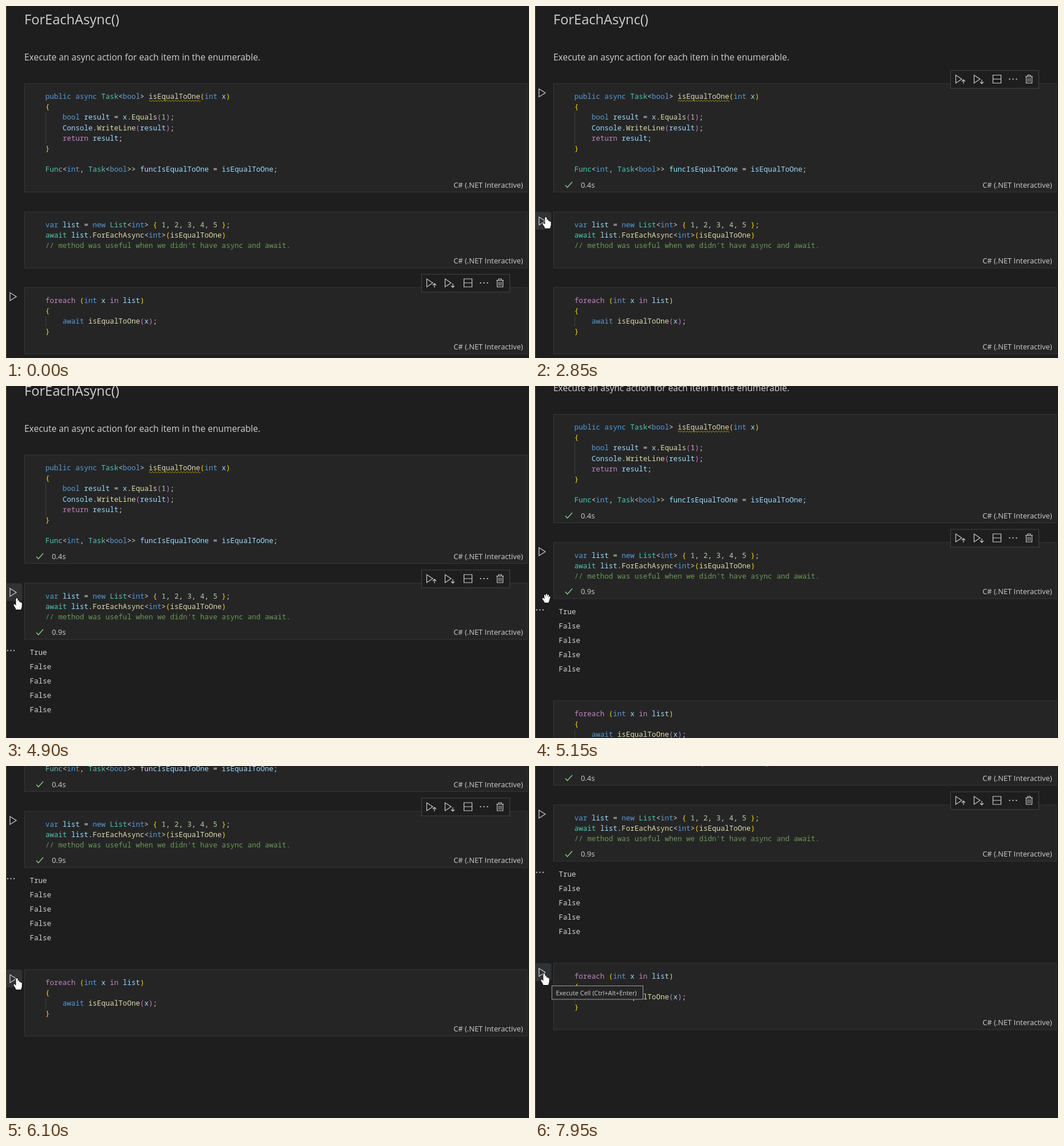
An HTML page with a canvas that plays this animation: 913x614 px, repeating every 8 s.

```html
<!DOCTYPE html>
<html lang="en">
<head>
<meta charset="utf-8">
<title>ForEachAsync notebook</title>
<style>
html, body { margin: 0; height: 100%; overflow: hidden; background: #1e1e1e; }
canvas { display: block; }
</style>
</head>
<body>
<canvas id="stage" width="913" height="614"></canvas>
<script>
const ctx = document.getElementById('stage').getContext('2d');
const LOOP = 8000;
const UI = '"Open Sans", "Noto Sans", sans-serif';
const MONO = '12.52px "Noto Sans Mono", monospace';
const LINE = 18.2;
const BUTTON = 31;

const COLORS = {
  k: '#569cd6', t: '#4ec9b0', v: '#9cdcfe', f: '#dcdcaa', c: '#c586c0',
  g: '#ffd700', m: '#da70d6', n: '#b5cea8', p: '#d4d4d4', r: '#6a9955'
};

// Tokens are split by "~"; the first letter of each picks its colour.
const CELLS = [
  { top: 135.5, height: 189, guide: [49, 105], code: [
    'kpublic async ~tTask~p<~kbool~p> ~fisEqualToOne~g(~kint ~vx~g)',
    'g{',
    'k    bool ~vresult ~p= ~vx~p.~fEquals~m(~n1~m)~p;',
    'v    Console~p.~fWriteLine~m(~vresult~m)~p;',
    'c    return ~vresult~p;',
    'g}',
    'p',
    'tFunc~p<~kint~p, ~tTask~p<~kbool~p>> ~vfuncIsEqualToOne ~p= ~visEqualToOne~p;'
  ] },
  { top: 359, height: 98, code: [
    'kvar ~vlist ~p= ~knew ~tList~p<~kint~p> ~g{ ~n1~p, ~n2~p, ~n3~p, ~n4~p, ~n5 ~g}~p;',
    'tawait ~vlist~p.~fForEachAsync~p<~kint~p>~g(~fisEqualToOne~g)',
    "r// method was useful when we didn't have async and await."
  ] },
  { top: 491, height: 116, guide: [50, 69], code: [
    'cforeach ~g(~kint ~vx ~cin ~vlist~g)',
    'g{',
    'k    await ~fisEqualToOne~m(~vx~m)~p;',
    'g}'
  ] }
];

// When each cell is clicked, starts counting and finishes.
const RUNS = [
  { click: 1150, start: 1370, end: 1830 },
  { click: 3350, start: 3460, end: 4440 }
];
const OUTPUT_AT = 4400;
const OUTPUT_HEIGHT = 144;
const TOOLTIPS = [
  { from: 3850, to: 4480, y: 383.5, width: 112, text: 'Stop Cell Execution' },
  { from: 7150, to: LOOP, y: 383.5, width: 159, text: 'Execute Cell (Ctrl+Alt+Enter)' }
];
const POINTER = [
  [50, -20, 300], [550, 19, 160], [800, 19, 160], [900, 19, 157], [1850, 19, 157],
  [2150, 19, 215], [2900, 19, 370], [6800, 19, 370], [7250, 18, 366], [7900, 16, 362]
];

function pointerAt(t) {
  const next = POINTER.findIndex(k => k[0] > t);
  if (next === 0) return POINTER[0].slice(1);
  if (next < 0) return POINTER[POINTER.length - 1].slice(1);
  const [t0, x0, y0] = POINTER[next - 1], [t1, x1, y1] = POINTER[next];
  const p = (t - t0) / (t1 - t0), e = p * p * (3 - 2 * p);
  return [x0 + (x1 - x0) * e, y0 + (y1 - y0) * e];
}

// The page speeds up to 235 px, then glides to rest at 291 px.
function scrollAt(t) {
  if (t < 4750) return 0;
  if (t > 5600) return Math.round(291 - 56 * Math.exp((5600 - t) / 300));
  const p = (t - 4750) / 850;
  return Math.round(p * p * (521 - 286 * p));
}

function text(str, x, y, font, color = '#cccccc', align = 'left') {
  ctx.font = font;
  ctx.fillStyle = color;
  ctx.textAlign = align;
  ctx.fillText(str, x, y);
}

const ui = (size, str, x, y, align) => text(str, x, y, `${size}px ${UI}`, '#d0d0d0', align);

function stroke(d, color = '#cccccc', width = 1.2) {
  ctx.strokeStyle = color;
  ctx.lineWidth = width;
  ctx.stroke(new Path2D(d));
}

function box(x, y, w, h, fill, border) {
  ctx.fillStyle = fill;
  ctx.fillRect(x, y, w, h);
  ctx.strokeStyle = border;
  ctx.lineWidth = 1;
  ctx.strokeRect(x, y, w, h);
}

function at(x, y, draw) {
  ctx.save();
  ctx.translate(x, y);
  draw();
  ctx.restore();
}

function dots(x, y, gap, size) {
  ctx.fillStyle = '#cccccc';
  for (let i = 0; i < 3; i++) ctx.fillRect(x + i * gap, y, size, size);
}

function codeLine(line, y) {
  let x = 68.7;
  for (const token of line.split('~')) {
    const str = token.slice(1);
    text(str, x, y, MONO, COLORS[token[0]]);
    x += ctx.measureText(str).width;
  }
}

function squiggle(y) {
  let d = `M249.5 ${y}`;
  for (let x = 249.5; x < 338; x += 5) d += 'q1.25 -2.6 2.5 0t2.5 0';
  stroke(d, '#cca700', 1);
}

function status(run, t, y) {
  if (!run || t < run.start) return;
  const elapsed = Math.min(t, run.end) - run.start;
  ui(12.9, (Math.floor(elapsed / 100) / 10).toFixed(1) + 's', 80, y + 4.5);
  at(59, y, () => {
    if (t >= run.end) return stroke('M-6 .5L-2.5 4.5L6-5', '#89d185', 1.4);
    ctx.rotate(elapsed / 1500 * 2 * Math.PI);
    const half = 'M-5 1A5 5 0 0 1 4-3M4.6-6V-2.6H1';
    stroke(half);
    ctx.rotate(Math.PI);
    stroke(half);
  });
}

function runButton(y, hot, busy) {
  if (hot) {
    ctx.fillStyle = '#313233';
    ctx.beginPath();
    ctx.roundRect(1, y, 27.5, BUTTON, [0, 4, 4, 0]);
    ctx.fill();
  }
  at(0, y, () => stroke(busy ? 'M7.5 10.5h10v10h-10z' : 'M7 9V23L18 16Z', '#d0d0d0', 1.2));
}

function toolbar(y) {
  box(725.5, y - 23, 154, 31, '#1e1e1e', '#454545');
  at(725, y - 8, () => {
    stroke('M9.5-7V7L20 0ZM23 8V1M20 4L23 1L26 4');
    stroke('M41.5-7V7L52 0ZM55 1V8M52 5L55 8L58 5');
    stroke('M74.5-7h14v14h-14zM74.5 0h14');
    dots(102.5, -1, 6, 2);
    stroke('M131-4.5H144M135-5V-7H140V-5M132.5-4V7H142.5V-4M135.8-2V5M139.2-2V5');
  });
}

function drawCell(cell, index, y, t) {
  const bottom = y + cell.height;
  const run = RUNS[index];
  box(32.5, y, 877.5, cell.height, '#252526', '#37373a');
  cell.code.forEach((line, i) => codeLine(line, y + 26.5 + i * LINE));
  if (cell.guide) stroke(`M69.5 ${y + cell.guide[0]}V${y + cell.guide[1]}`, '#404040', 1);
  if (index === 0 && (t < 1150 || t > 1950)) squiggle(y + 30);
  ui(12.9, 'C# (.NET Interactive)', 902.5, bottom - 8, 'right');
  status(run, t, bottom - 12.5);
  if (index === 1 && t >= run.click) {
    dots(2, bottom + 18.5, 5.5, 2);
    if (t >= OUTPUT_AT) {
      ['True', 'False', 'False', 'False', 'False']
        .forEach((str, i) => text(str, 41.5, bottom + 26.5 + i * 25, MONO, '#d4d4d4'));
    }
  }
}

const SHAPES = {
  arrow: 'M0 0V15L3.6 11.8L6 17L8.4 16L6 10.8H10.8Z',
  hand: 'M-1.6 1.2Q0-1 1.6 1.2V6.5Q3-.1 4.4 7Q6 5.8 6.8 7.8Q8.6 7 8.8 9.5V14' +
    'Q8.5 17 7 20H-1.5Q-2.5 17-5 13.5Q-6.5 10.5-4.5 10.5Q-3 10.8-1.6 13Z',
  grab: 'M-3-5Q-1.8-7-.8-5L0-1V-6.5Q1.2-8.5 2.3-6.5V-1L3.2-5.5Q4.8-7 5.2-5' +
    'L4.8 0L6-3Q7.8-4 7.8-2L6 4Q5.5 6 4.5 8H-2Q-3 5.5-6 2Q-7-.5-5-.5L-2.4 1.5Z'
};

function drawPointer(x, y, shape) {
  at(x, y, () => {
    stroke(SHAPES[shape], '#000', 1.6);
    ctx.fillStyle = '#fff';
    ctx.fill(new Path2D(SHAPES[shape]));
  });
}

function draw(t) {
  const scroll = scrollAt(t);
  const [px, py] = pointerAt(t);
  const pushed = t >= RUNS[1].click ? OUTPUT_HEIGHT : 0;
  const tops = CELLS.map((cell, i) => cell.top - scroll + (i === 2 ? pushed : 0));
  const focus = t < RUNS[0].click ? 2 : t < RUNS[1].click ? 0 : 1;
  const hover = px < 0 ? -1 : CELLS.findIndex((c, i) => py >= tops[i] && py <= tops[i] + c.height);
  const onButton = hover >= 0 && py < tops[hover] + BUTTON;

  ctx.fillStyle = '#1e1e1e';
  ctx.fillRect(0, 0, 913, 614);
  ctx.fillStyle = '#68481c';
  ctx.fillRect(0, 0, 1, 614);

  ui(23.6, 'ForEachAsync()', 32, 31.5 - scroll);
  ui(15.5, 'Execute an async action for each item in the enumerable.', 32, 94.5 - scroll);
  CELLS.forEach((cell, i) => {
    drawCell(cell, i, tops[i], t);
    const run = RUNS[i];
    if (i === focus || i === hover) {
      runButton(tops[i], i === hover && onButton, run && t >= run.click && t < run.end);
    }
  });
  toolbar(tops[focus]);

  for (const tip of TOOLTIPS) {
    if (t < tip.from || t >= tip.to) continue;
    box(29.5, tip.y, tip.width, 23.5, '#252526', '#a0a0a0');
    ui(10.9, tip.text, 36.5, tip.y + 16);
  }
  drawPointer(px, py, hover < 0 ? 'arrow' : onButton ? 'hand' : 'grab');
}

function frame() {
  draw(performance.now() % LOOP);
  requestAnimationFrame(frame);
}
frame();
</script>
</body>
</html>
```
